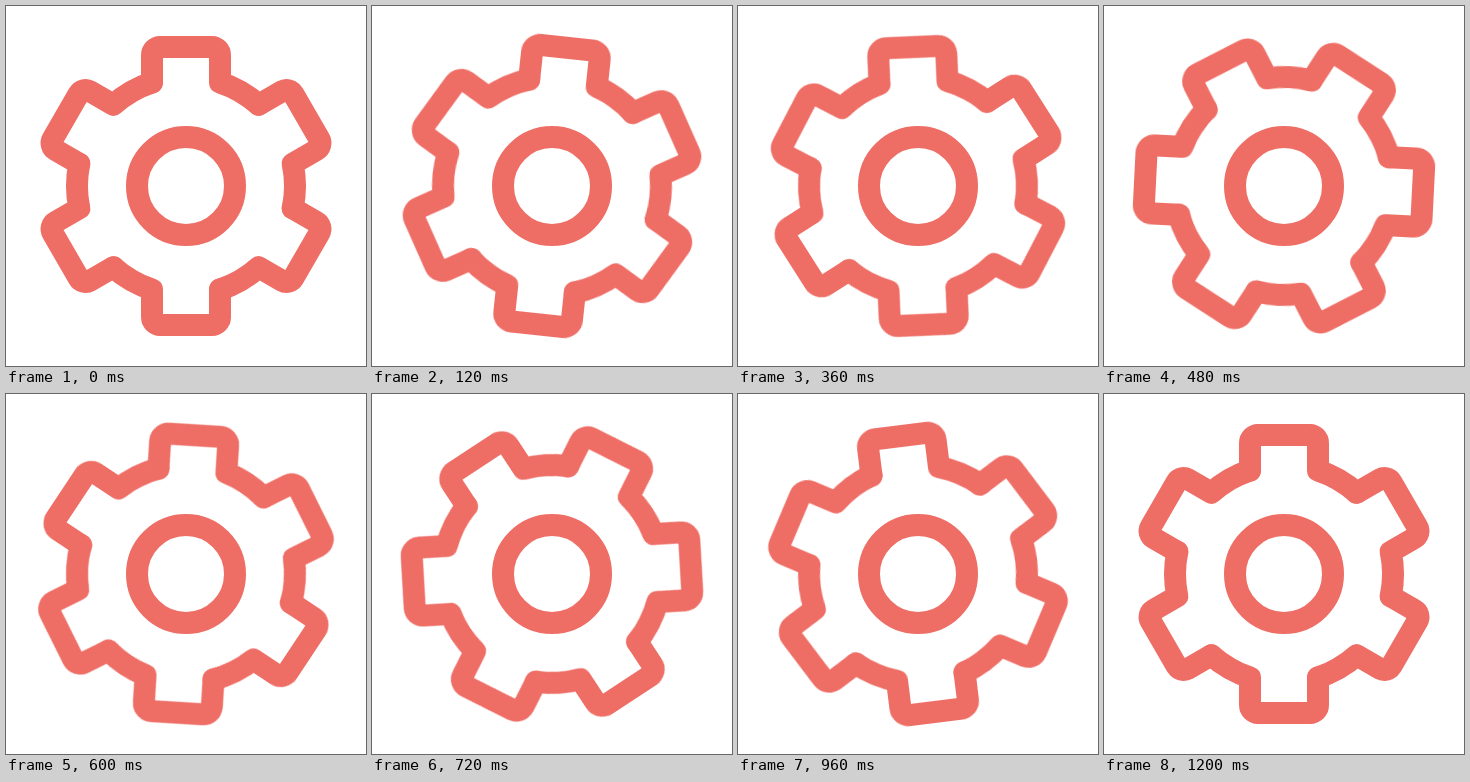
An HTML page that plays this animation: 360x360 px, repeating every 1.23 s.

```html
<!DOCTYPE html>
<html lang="en">
<head>
<meta charset="utf-8">
<title>Turning gear</title>
<style>
  html, body {
    margin: 0;
    width: 100%;
    height: 100%;
    overflow: hidden;
    background: #fff;
  }
  svg {
    display: block;
    width: 100vw;
    height: 100vh;
    fill: none;
    stroke: #ee6e66;
    stroke-width: 22;
    stroke-linecap: round;
    stroke-linejoin: round;
  }
  .gear {
    transform-origin: 0 0;
    animation: turn 1230ms infinite;
  }
  /* Half a turn in 1200 ms, then a short rest */
  @keyframes turn {
    0% {
      transform: rotate(0deg);
      animation-timing-function: cubic-bezier(.333, 0, .38, 1);
    }
    97.561%, 100% { transform: rotate(180deg); }
  }
</style>
</head>
<body>
<svg viewBox="-180 -180 360 360">
  <defs>
    <!-- One tooth and the rim up to the next -->
    <path id="tooth" d="M-34-103.56V-131a8 8 0 0 1 8-8H26a8 8 0 0 1 8 8V-103.56A109 109 0 0 1 72.69-81.22"/>
  </defs>
  <g class="gear">
    <use href="#tooth"/>
    <use href="#tooth" transform="rotate(60)"/>
    <use href="#tooth" transform="rotate(120)"/>
    <use href="#tooth" transform="rotate(180)"/>
    <use href="#tooth" transform="rotate(240)"/>
    <use href="#tooth" transform="rotate(300)"/>
  </g>
  <circle r="49"/>
</svg>
</body>
</html>
```
